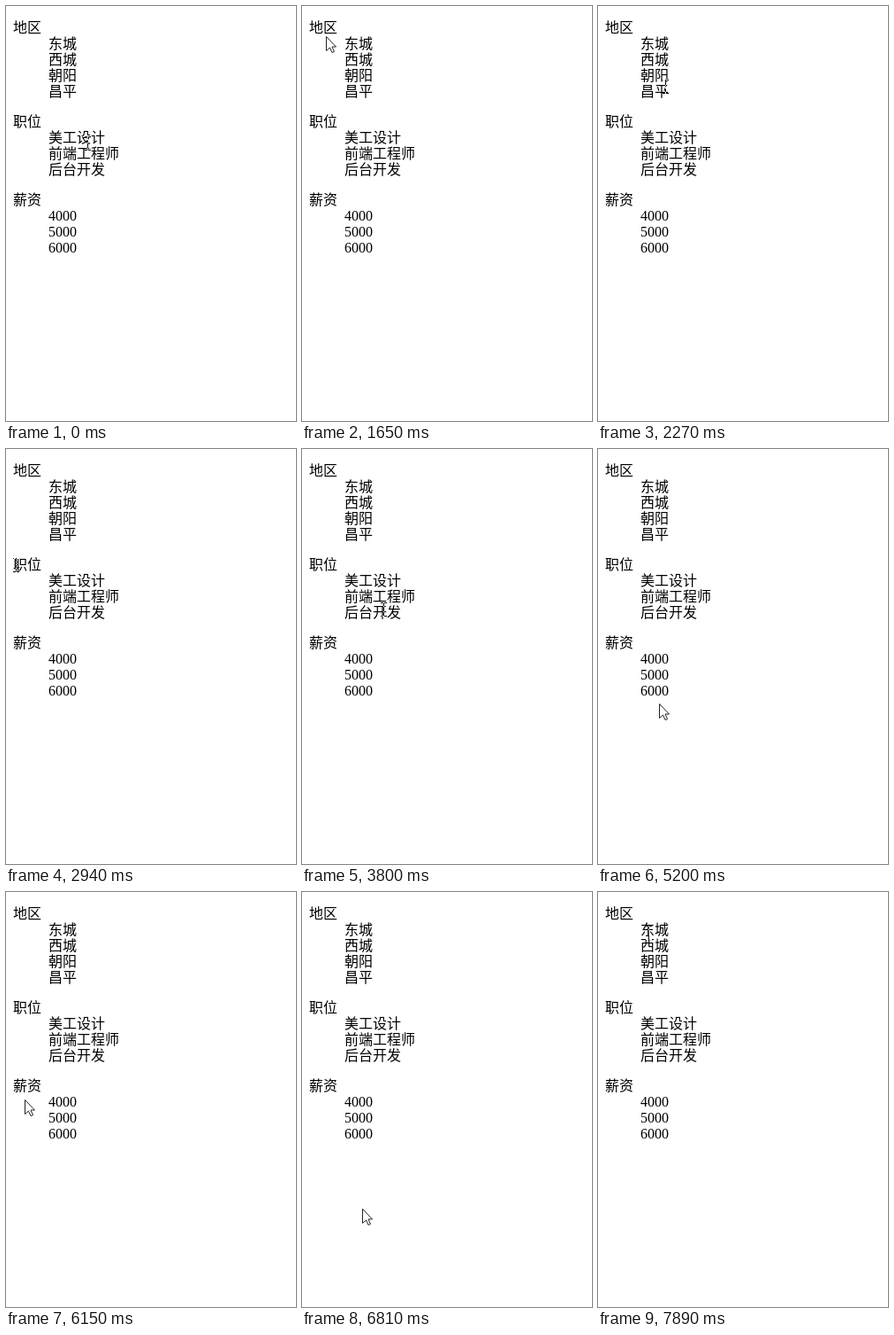
These frames come from a looping animation (328 px wide and 468 px high, 8 s). An HTML page:

```html
<!DOCTYPE html>
<html lang="zh-CN">
<head>
<meta charset="utf-8">
<style>
  html, body { margin: 0; width: 100%; height: 100%; overflow: hidden; background: #fff; }
  svg { display: block; width: 328px; height: 468px; }
  text { font: 300 16px "Noto Sans CJK SC", "Noto Sans CJK", sans-serif; fill: #000; }
  text.num { font: 16px "Liberation Serif", serif; }
  #beam { fill: #fff; mix-blend-mode: difference; }
  #arrow { fill: #fff; stroke: #222; stroke-width: 1; }
</style>
</head>
<body>
<svg viewBox="0 0 328 468">
  <rect width="328" height="468" fill="#fff"/>
  <g id="list"></g>
  <path id="beam" shape-rendering="crispEdges" d="M-3-8h3v1h1v-1h3v1h-3v14h3v1h-3v-1h-1v1h-3v-1h3v-14h-3z"/>
  <path id="arrow" d="M.5.5V16.5L4.5 13 7 18.5 9.5 17.5 7 12H11.5Z"/>
</svg>
<script>
const LOOP = 8000, STEP = 60, ROW = 18;
const el = id => document.getElementById(id);

const groups = [
  ['地区', '东城', '西城', '朝阳', '昌平'],
  ['职位', '美工设计', '前端工程师', '后台开发'],
  ['薪资', '4000', '5000', '6000']
];

// Lay out the definition list and remember where its text can be hit.
const hits = [];
let rowY = 24;
for (const group of groups) {
  group.forEach((label, i) => {
    const x = i ? 48 : 8, isNum = /^\d/.test(label);
    const node = document.createElementNS('http://www.w3.org/2000/svg', 'text');
    node.setAttribute('x', x);
    node.setAttribute('y', rowY + 6);
    if (isNum) node.setAttribute('class', 'num');
    node.textContent = label;
    el('list').append(node);
    hits.push({ x, right: x + label.length * (isNum ? 8 : 16), y: rowY });
    rowY += ROW;
  });
  rowY += 16;
}

// Each move: start, end, then evenly spaced points of the pointer path.
const moves = [
  [0, 0, [[92, 155]]],
  [330, 450, [[98, 168], [68, 45]]],
  [710, 1460, [[66, 44], [51, 39], [66, 40]]],
  [1590, 1650, [[46, 36], [27, 34]]],
  [1850, 2570, [[14, 24], [2, 46], [62, 93], [88, 70], [40, 28]]],
  [2700, 2940, [[36, 36], [11, 131]]],
  [3000, 3500, [[4, 131], [48, 128], [101, 130]]],
  [3560, 4350, [[108, 138], [104, 180], [30, 170], [3, 190], [8, 213]]],
  [4410, 4530, [[8, 210], [4, 217]]],
  [4590, 5200, [[16, 218], [92, 230], [104, 260], [68, 288]]],
  [5260, 5620, [[56, 286], [3, 240], [8, 208], [21, 234]]],
  [6150, 6810, [[21, 234], [10, 207], [124, 310], [102, 392], [68, 357]]],
  [6870, 6930, [[60, 353]]],
  [6990, 7770, [[62, 363], [108, 284], [72, 140], [57, 48]]],
  [7830, 7890, [[57, 47], [57, 46]]]
];

// Smooth curve through the points, u from 0 to 1.
function along(pts, u) {
  const last = pts.length - 1, at = i => pts[Math.max(0, Math.min(last, i))];
  const i = Math.min(Math.floor(u * last), Math.max(0, last - 1)), f = u * last - i;
  return [0, 1].map(k => {
    const a = at(i - 1)[k], b = at(i)[k], c = at(i + 1)[k], d = at(i + 2)[k];
    const v = b + f / 2 * (c - a + f * (2 * a - 5 * b + 4 * c - d + f * (3 * (b - c) + d - a)));
    return Math.max(0, Math.round(v));
  });
}

function pointer(t) {
  const [start, end, pts] = moves.findLast(m => m[0] <= t);
  const time = Math.min(Math.floor((t - start) / STEP) * STEP, end - start);
  return along(pts, end > start ? time / (end - start) : 0);
}

function draw(t) {
  const [x, y] = pointer(t);
  const onText = hits.some(h => x >= h.x && x < h.right && Math.abs(y - h.y) < 9);
  for (const id of ['beam', 'arrow']) {
    el(id).setAttribute('transform', `translate(${x} ${y})`);
    el(id).setAttribute('visibility', (id === 'beam') === onText ? 'visible' : 'hidden');
  }
}

const began = performance.now();
function tick() {
  draw(Math.max(0, performance.now() - began) % LOOP);
  requestAnimationFrame(tick);
}
tick();
</script>
</body>
</html>
```
